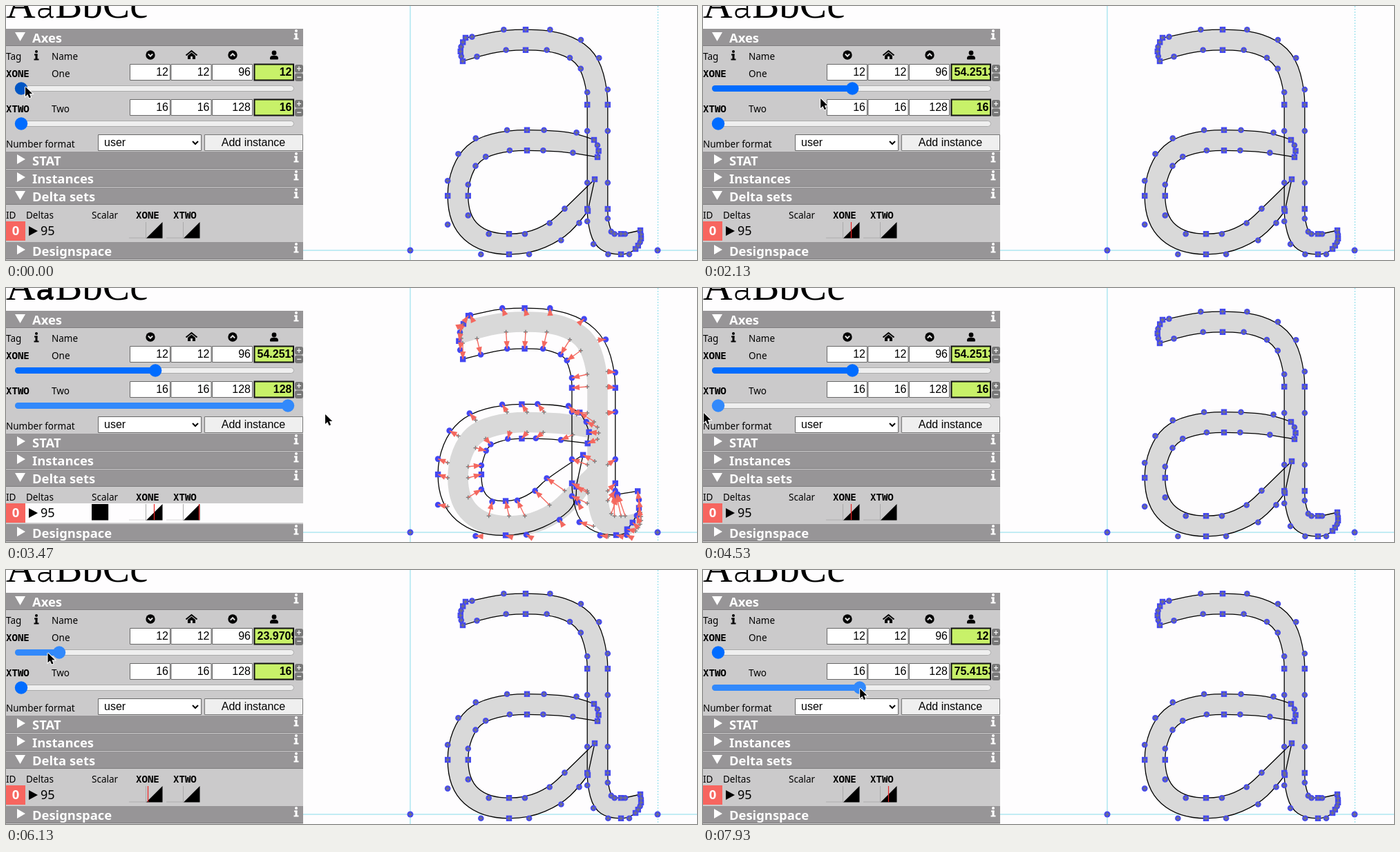
Write an HTML page with a canvas that moves like this. It is 1000 by 368 pixels and loops after 8000 ms.

```html
<!DOCTYPE html>
<html lang="en">
<head>
<meta charset="utf-8">
<title>Variable font axes</title>
<style>
html, body { margin: 0; width: 1000px; height: 368px; overflow: hidden; background: #fefdfe; }
canvas { display: block; }
</style>
</head>
<body>
<canvas id="stage" width="1000" height="368"></canvas>
<script>
const g = document.getElementById('stage').getContext('2d');
const LOOP = 8000, LAG = 40, TRAVEL = 386;
const UI = '"Noto Sans", sans-serif', FORM = '"Liberation Sans", Arial, sans-serif';
const MONO = '"Noto Sans Mono", monospace', SERIF = '"Liberation Serif", serif';
const LABEL = '13.5px ' + UI, HEAD = '600 18.4px ' + UI, INPUT = '16px ' + FORM, TAG = 'bold 14.1px ' + MONO;

// The letter is two pen strokes: centre line nodes (third value: on-curve) and cut ends
const strokes = [
  { drift: 0.04, gain: 14.5,
    start: { a: [665, 46], b: [661, 80], cap: 4 }, end: { a: [918, 325], b: [911, 352], cap: 4 },
    nodes: [[678,59], [722,49], [752,49,1], [785,49], [824,62], [845,83], [856,123], [856,143,1], [856,181],
      [856,256], [856,294,1], [856,310], [863,336], [876,345], [890,345,1], [899,345]] },
  { drift: 0.1, gain: 10,
    start: { a: [856, 219], b: [851, 194], cap: 2 }, end: { a: [852, 251], b: [842, 297], cap: 0 },
    nodes: [[823,198], [778,194.5], [754,194.5,1], [727,194.5], [687,205], [667,223], [654,256], [654,275,1],
      [654,310], [693,345], [728,345,1], [754,345], [795,327], [819,304]] }
];

// Pointer gestures: start, end, x, y
const gestures = [
  [60, 600, 423.88, 121], [650, 1471, 222.155, 123], [1900, 2600, 18.16, 166], [2701, 3175, 462, 183],
  [3560, 4480, 1, 181], [4700, 5100, 10, 180], [5250, 5600, 218, 118], [5700, 6350, 4, 121],
  [6450, 6950, 16, 163], [7060, 8050, 235.97, 172]];
const drags = [
  { axis: 0, press: 50, release: 1550 }, { axis: 1, press: 2690, release: 5180 },
  { axis: 0, press: 5650, release: 6430 }, { axis: 1, press: 7050, release: LOOP }];

const clamp = (v, lo = 0, hi = 1) => Math.min(hi, Math.max(lo, v));
const mix = (a, b, u) => a + (b - a) * u;

function pointerAt(t) {
  let x = 28, y = 117;
  for (const [from, to, gx, gy] of gestures) {
    const u = clamp((t - from) / (to - from)), s = u * u * (3 - 2 * u);
    x = mix(x, gx, s);
    y = mix(y, gy, s);
  }
  return [x, y];
}

// A dragged thumb follows the pointer a little late
function fractionAt(axis, t) {
  let frac = 0;
  for (const d of drags) {
    if (d.axis !== axis || t < d.press) continue;
    const seen = Math.max(d.press, Math.min(t, d.release) - LAG);
    frac = clamp(frac + (pointerAt(seen)[0] - pointerAt(d.press)[0]) / TRAVEL);
  }
  return frac;
}

function box(x, y, w, h, fill, edge, r = 0, line = 1) {
  g.beginPath();
  g.roundRect(x, y, w, h, r);
  g.fillStyle = fill;
  g.fill();
  if (edge) { g.strokeStyle = edge; g.lineWidth = line; g.stroke(); }
}
function disc(x, y, r, fill) {
  g.beginPath();
  g.arc(x, y, r, 0, 7);
  g.fillStyle = fill;
  g.fill();
}
function poly(points, fill) {
  g.beginPath();
  points.forEach(p => g.lineTo(...p));
  g.fillStyle = fill;
  g.fill();
}
function line(points, color, width = 1) {
  g.beginPath();
  points.forEach(p => g.lineTo(...p));
  g.strokeStyle = color;
  g.lineWidth = width;
  g.stroke();
}
function text(s, x, y, font, color = '#000', align = 'left') {
  g.font = font;
  g.fillStyle = color;
  g.textAlign = align;
  g.fillText(s, x, y);
}

function info(x, y, color) {
  disc(x, y - 6, 2, color);
  box(x - 3, y - 2.5, 4.5, 2, color);
  box(x - 1.5, y - 2.5, 3, 8, color);
  box(x - 3.5, y + 4.5, 7, 2, color);
}
function bar(label, y, open) {
  box(0, y, 430, 25, '#979597');
  box(0, y + 24, 430, 1, '#7f7d7f');
  poly(open ? [[13, y + 5], [28, y + 5], [20.5, y + 18]] : [[16, y + 4], [28, y + 11], [16, y + 18]], '#fff');
  text(label, 38, y + 19.5, HEAD, '#fff');
  info(420, y + 9, '#fff');
}

function icons() {
  for (const [x, d] of [[209, 1], [328, -1]]) {
    disc(x, 71, 6.7, '#000');
    line([[x - 3.2, 71 - 1.5 * d], [x, 71 + 1.8 * d], [x + 3.2, 71 - 1.5 * d]], '#ddd', 2);
  }
  line([[260.5, 71.5], [268.5, 65], [276.5, 71.5]], '#000', 2);
  poly([[263, 72], [268.5, 67.5], [274, 72], [274, 77], [263, 77]], '#000');
  box(267, 73, 3, 4, '#cbcacb');
  disc(388, 68, 3.4, '#000');
  box(382, 72, 12, 5.5, '#000', null, [4, 4, 1, 1]);
}

function userField(value, y) {
  box(359.5, y + 0.5, 56.5, 23, '#c8f169', '#111', 0, 2);
  g.save();
  g.beginPath();
  g.rect(361, y, 54, 24);
  g.clip();
  const whole = Number.isInteger(value);
  text(whole ? value : value.toFixed(6), whole ? 413.5 : 363.5, y + 17, 'bold ' + INPUT, '#000', whole ? 'right' : 'left');
  g.restore();
}

function axis(tag, name, min, max, frac, y, color) {
  text(tag, 0, y + 19, TAG);
  text(name, 66, y + 19, LABEL);
  [min, min, max].forEach((v, i) => {
    const x = 179.5 + 59.5 * i;
    box(x, y + 0.5, 58, 23, '#fff', '#686868');
    text(v, x + 55.5, y + 17, INPUT, '#000', 'right');
  });
  userField(mix(min, max, frac), y);
  ['+', '−'].forEach((s, i) => {
    box(418, y + 1 + 12.5 * i, 12, 11.5, '#777', null, 3);
    text(s, 424, y + 10.5 + 12.5 * i, 'bold 12px ' + FORM, '#eee', 'center');
  });
  const cx = 22 + TRAVEL * frac, cy = y + 35.5;
  box(13.5, cy - 4, 403, 8, '#efefef', '#aaa', 4);
  if (frac > 0) box(13, cy - 4.5, cx - 13, 9, color, null, 4.5);
  disc(cx, cy, 9.2, color);
}

function ramp(x, frac) {
  line([[x, 336], [x + 24, 336]], 'rgba(0,0,0,.15)');
  line([[x + 24.5, 313], [x + 24.5, 337]], '#aaa');
  poly([[x + 25, 336.5], [x + 48.5, 313], [x + 48.5, 336.5]], '#000');
  if (frac > 0) {
    const rx = Math.round(x + 24 + 23 * frac) + 0.5;
    line([[rx, 313], [rx, 336]], '#e22', 1.2);
  }
}

// Offset direction at each node: mitred normal of the two neighbouring segments
function withNormals({ start, end, nodes }) {
  const cut = ({ a, b, cap }) => {
    const x = (a[0] + b[0]) / 2, y = (a[1] + b[1]) / 2, half = Math.hypot(a[0] - x, a[1] - y);
    return { x, y, on: 1, nx: (a[0] - x) / half, ny: (a[1] - y) / half, half, grow: cap ? 1 : 0 };
  };
  const list = [cut(start), ...nodes.map(([x, y, on]) => ({ x, y, on, half: 14.8, grow: 1 })), cut(end)];
  for (let i = 1; i < list.length - 1; i++) {
    const normal = (p, q) => {
      const d = Math.hypot(q.x - p.x, q.y - p.y);
      return [(q.y - p.y) / d, (p.x - q.x) / d];
    };
    const [ax, ay] = normal(list[i - 1], list[i]), [bx, by] = normal(list[i], list[i + 1]);
    const scale = 1 / (1 + ax * bx + ay * by);
    list[i].nx = (ax + bx) * scale;
    list[i].ny = (ay + by) * scale;
  }
  return list;
}
strokes.forEach(s => { s.spine = withNormals(s); });

// Closed contour around one stroke; weight k widens it and shifts it slightly
function outline({ spine, start, end, drift, gain }, k) {
  const side = sign => spine.map(({ x, y, on, nx, ny, half, grow }) => [
    x + k * (2.5 - drift * (x - 654)) + sign * nx * (half + 16.5 * k * grow),
    y + k * (9.5 - (y - 49) * (0.071 + (x - 728) * 1e-4)) + sign * ny * (half + gain * k * grow),
    on]);
  const cap = (p, q, count) => Array.from({ length: count }, (_, i) => {
    const u = (i + 1) / (count + 1), bulge = 0.15 * Math.sin(Math.PI * u);
    return [mix(p[0], q[0], u) + bulge * (q[1] - p[1]), mix(p[1], q[1], u) - bulge * (q[0] - p[0]), i % 2];
  });
  const a = side(1), b = side(-1).reverse();
  return [...a, ...cap(a.at(-1), b[0], end.cap), ...b, ...cap(b.at(-1), a[0], start.cap)];
}

// Quadratic outline with implied on-curve points
function trace(points) {
  let ctrl = null;
  g.beginPath();
  g.moveTo(...points[0].slice(0, 2));
  for (const [x, y, on] of [...points.slice(1), points[0]]) {
    if (on) {
      ctrl ? g.quadraticCurveTo(...ctrl, x, y) : g.lineTo(x, y);
      ctrl = null;
    } else {
      if (ctrl) g.quadraticCurveTo(...ctrl, (ctrl[0] + x) / 2, (ctrl[1] + y) / 2);
      ctrl = [x, y];
    }
  }
  g.closePath();
}
function fillGlyph(k, color) {
  g.fillStyle = color;
  for (const s of strokes) { trace(outline(s, k)); g.fill(); }
}

function arrow([x, y], [tx, ty]) {
  const len = Math.hypot(tx - x, ty - y);
  if (len < 0.01) return;
  const ux = (tx - x) / len, uy = (ty - y) / len, bx = tx - ux * 11, by = ty - uy * 11;
  line([[x, y], [tx, ty]], '#f4685f', 1.4);
  poly([[tx, ty], [bx - uy * 4.2, by + ux * 4.2], [bx + uy * 4.2, by - ux * 4.2]], '#f4685f');
}
function cross(x, y) {
  line([[x - 3, y], [x + 3, y]], '#777', 1.4);
  line([[x, y - 3], [x, y + 3]], '#777', 1.4);
}

function editor(k) {
  const cyan = '#86dcea', blue = '#4347f2';
  line([[430, 354], [1000, 354]], cyan);
  line([[585, 0], [585, 368]], cyan);
  g.setLineDash([2, 2]);
  line([[943.5, 0], [943.5, 368]], cyan);
  g.setLineDash([]);
  fillGlyph(0, '#d9d9d9');
  const shapes = strokes.map(s => outline(s, k));
  g.strokeStyle = '#000';
  g.lineWidth = 1.3;
  for (const s of shapes) { trace(s); g.stroke(); }
  const now = shapes.flat(), base = strokes.flatMap(s => outline(s, 0));
  for (const [x, y, on] of now) on ? box(x - 4.2, y - 4.2, 8.4, 8.4, blue) : disc(x, y, 4.3, blue);
  for (const x of [585, 943]) { disc(x, 354, 4.5, blue); cross(x, 354); }
  for (const [x, y] of base) cross(x, y);
  if (k > 0) base.forEach((p, i) => arrow(p, now[i]));
}

function specimen(k) {
  const font = '59px ' + SERIF;
  text('A', 0, 17, font);
  text('BbCc', 71, 17, font);
  g.save();
  g.translate(42, 17);
  g.scale(0.081, 0.081);
  g.translate(-585, -354);
  fillGlyph(k, '#000');
  g.restore();
}

function pointer(x, y) {
  const shape = [[0, 0], [0, 14], [3.3, 11], [5.6, 16.3], [8, 15.3], [5.8, 10], [10.2, 10], [0, 0]]
    .map(([a, b]) => [x + a, y + b]);
  line(shape, '#fff', 2);
  poly(shape, '#000');
}

function draw(t) {
  const [mx, my] = pointerAt(t), f1 = fractionAt(0, t), f2 = fractionAt(1, t);
  const scalar = f1 * f2, k = scalar * 2;
  const held = drags.find(d => t >= d.press && t < d.release);
  const color = (index, y) => held ? (held.axis === index ? '#3289fb' : '#006cff')
    : mx > 12 && mx < 418 && Math.abs(my - y) < 9.5 ? '#0056c4' : '#006cff';

  box(0, 0, 1000, 368, '#fefdfe');
  specimen(k);
  box(0, 33, 430, 335, '#cbcacb');
  bar('Axes', 33, true);
  text('Tag', 0, 78, LABEL);
  info(44, 72, '#000');
  text('Name', 66, 78, LABEL);
  icons();
  axis('XONE', 'One', 12, 96, f1, 84, color(0, 119.5));
  axis('XTWO', 'Two', 16, 128, f2, 135, color(1, 170.5));

  text('Number format', 0, 205, LABEL);
  box(133.5, 186.5, 149, 23, '#fff', '#666');
  text('user', 142, 203, INPUT);
  line([[270, 196], [274, 200], [278, 196]], '#000', 2);
  box(287.5, 186.5, 142, 23, '#efefef', '#767676');
  text('Add instance', 358, 203, INPUT, '#000', 'center');

  bar('STAT', 211, false);
  bar('Instances', 237, false);
  bar('Delta sets', 263, true);
  text('ID', 0, 308, LABEL);
  text('Deltas', 29, 308, LABEL);
  text('Scalar', 124, 308, LABEL);
  text('XONE', 188, 308, TAG);
  text('XTWO', 242, 308, TAG);
  if (scalar > 0) box(0, 312, 430, 28, '#fefdfe');
  box(0, 312, 28, 28, '#f7655f');
  text('0', 14, 332, HEAD, '#fff', 'center');
  poly([[33, 319], [46, 326], [33, 333]], '#000');
  text('95', 50, 332, '18px ' + UI);
  if (scalar > 0) box(124, 313, Math.max(1, 48 * scalar), 23.5, '#000');
  ramp(178, f1);
  ramp(232, f2);
  bar('Designspace', 342, false);

  editor(k);
  pointer(mx, my);
}

function frame() {
  draw(performance.now() % LOOP);
  requestAnimationFrame(frame);
}
frame();
</script>
</body>
</html>
```
